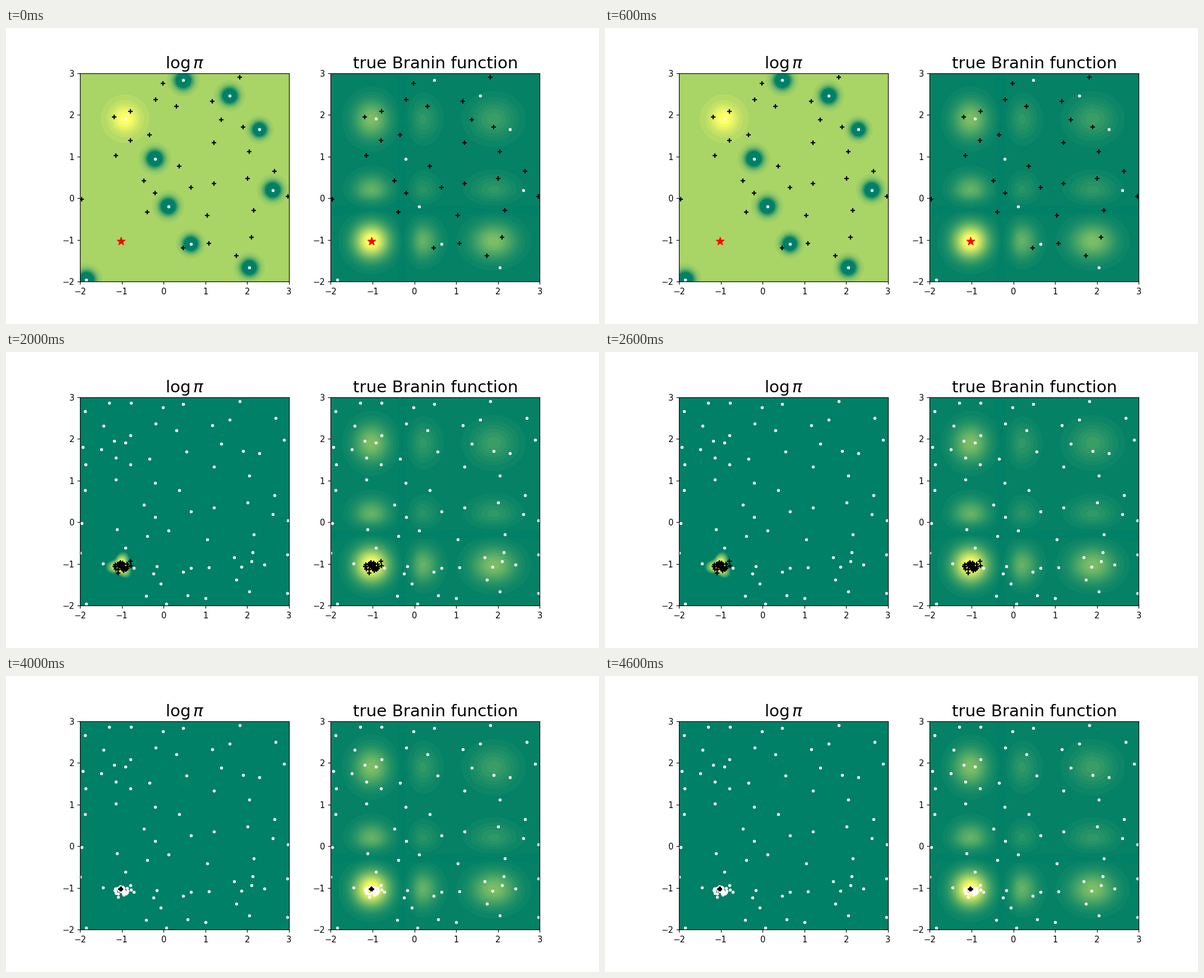
Write a matplotlib script that moves like this. It is 1058 px wide and 529 px high and loops after 5000 ms.

```python
import numpy as np
import matplotlib.pyplot as plt
from matplotlib.animation import ArtistAnimation

LEVELS = 25
COLORS = plt.get_cmap("summer")(np.linspace(0, 1, LEVELS) ** 1.2)
BOUNDS = np.linspace(0, 1, LEVELS + 1) ** 1.2
OPTIMUM = (-1.025, -1.025)
PROMISING = .3

rng = np.random.default_rng(4)
axis = np.linspace(-2, 3, 301)
X, Y = np.meshgrid(axis, axis)

start = np.array([
    (.47, 2.83), (1.58, 2.46), (2.29, 1.65), (-.92, 1.91), (-.21, .95),
    (2.61, .2), (.11, -.19), (.65, -1.09), (2.05, -1.66), (-1.85, -1.95)])
spread = np.array([
    (-.02, 2.76), (1.82, 2.91), (-.19, 2.36), (.31, 2.2), (1.16, 2.32),
    (1.38, 1.89), (1.9, 1.71), (-1.19, 1.95), (-.79, 2.09), (-.34, 1.52),
    (-.8, 1.39), (-1.15, 1.03), (1.2, 1.34), (2.05, 1.12), (.37, .77),
    (-.48, .42), (-.2, .12), (.65, .26), (1.2, .36), (2.01, .48),
    (2.65, .65), (2.97, .04), (-1.96, -.02), (-.39, -.33), (1.04, -.41),
    (2.16, -.29), (.46, -1.19), (1.08, -1.08), (2.1, -.94), (1.74, -1.37)])


def bump(x, y, sx, sy=None):
    sy = sy or sx
    return np.exp(-((X - x) / sx) ** 2 / 2 - ((Y - y) / sy) ** 2 / 2)


def plateau(level, *shape):
    return level * np.minimum(1, 2 * bump(*shape))


def lobe(t, center, left, right):
    width = np.where(t < center, left, right)
    return np.exp(-((t - center) / width) ** 2)


def profile(t, wide):
    return (lobe(t, -1.025, .4, .4) + .36 * lobe(t, .2, .25, .34)
            + .46 * lobe(t, 1.9, wide, wide))


def branin(x, y):
    return profile(x, .5) * profile(y, .44)


def true_field():
    def dip(t):
        return 1 - np.exp(-((t + .3) / .1) ** 2)
    return branin(X, Y) + .027 * dip(X) * dip(Y)


def first_field():
    v = np.full_like(X, .655)
    for x, y in start:
        f = branin(x, y)
        if f > PROMISING:
            v += .345 * bump(x, y, .24)
        else:
            v -= 1.4 * bump(x, y, .14 - .2 * f)
    return v


def second_field():
    v = np.full_like(X, .49)
    for x, y in np.vstack([start, spread]):
        if branin(x, y) < PROMISING:
            v -= 1.3 * bump(x, y, .25)
    v -= .4 * bump(2.65, -.1, .2)
    lights = [
        plateau(.5, -1.3, 1.65, .26), plateau(.97, -1.05, 1.74, .17, .19),
        plateau(.85, -.8, 1.87, .12, .06), plateau(.42, 2.25, 2.35, .2),
        plateau(.62, -.05, -1.3, .22, .35), plateau(.52, .6, -1.85, .6, .26),
        plateau(.78, 2.1, -.95, .42, .2), plateau(.4, 1.6, -.35, .12, .33)]
    v = np.maximum.reduce([v, *lights])
    return v - .8 * bump(-1.28, 1.99, .08, .06) - 1.2 * bump(2.1, -.93, .05)


def third_field():
    dx, dy = X + 1.04, Y + 1.04
    reach = .285 + .07 * np.cos(3 * (np.arctan2(dy, dx) - np.radians(70)))
    return .85 * np.clip(1.7 * (1 - np.hypot(dx, dy) / reach), 0, 1)


def last_field():
    return (.03 * bump(.52, 1.57, .2, .17) + .03 * bump(-1.8, 3.05, .3, .12)
            + .03 * bump(3, -2, .25, .12))


def explore(field, known, count, tries=8):
    """Draw bright spots of the field that keep away from known points."""
    weight = np.clip(field, 0, 1).ravel() ** 2
    points = known
    for _ in range(count):
        pick = rng.choice(weight.size, tries, p=weight / weight.sum())
        spots = np.column_stack([X.ravel()[pick], Y.ravel()[pick]])
        gap = np.linalg.norm(spots[:, None] - points, axis=2).min(axis=1)
        best = np.argmax(gap * field.ravel()[pick])
        points = np.vstack([points, spots[best]])
    return points[len(known):]


def fill(ax, field):
    return ax.contourf(X, Y, np.clip(field, 0, .9999), BOUNDS, colors=COLORS)


fields = [first_field(), second_field(), third_field(),
          np.zeros_like(X), last_field()]
refine = explore(fields[1], np.vstack([start, spread]), 30)
cluster = rng.normal((-1.06, -1.06), (.1, .085), (30, 2))
tight = OPTIMUM + rng.uniform(-.03, .03, (30, 2))
final = OPTIMUM + rng.normal(0, .003, (30, 2))

fig, axes = plt.subplots(1, 2, figsize=(10, 5), dpi=105.8)
for ax, title in zip(axes, [r"$\log \pi$", "true Branin function"]):
    ax.set_title(title, fontsize=20)
    ax.set_aspect("equal")
    ax.set(xlim=(-2, 3), ylim=(-2, 3), xticks=range(-2, 4), yticks=range(-2, 4))
    ax.scatter(*OPTIMUM, s=100, c="red", marker="*", lw=1, zorder=2)
fill(axes[1], true_field())

steps = []
seen = start
for field, batch in zip(fields, [spread, refine, cluster, tight, final]):
    artists = [fill(axes[0], field)]
    for ax in axes:
        artists.append(ax.scatter(*seen.T, s=30, c="white", marker=".", zorder=2.1))
        artists.append(ax.scatter(*batch.T, s=30, c="black", marker="+", zorder=2.2))
    steps.append(artists)
    seen = np.vstack([seen, batch])

anim = ArtistAnimation(fig, steps, interval=1000, repeat=True, repeat_delay=0)
plt.show()
```
